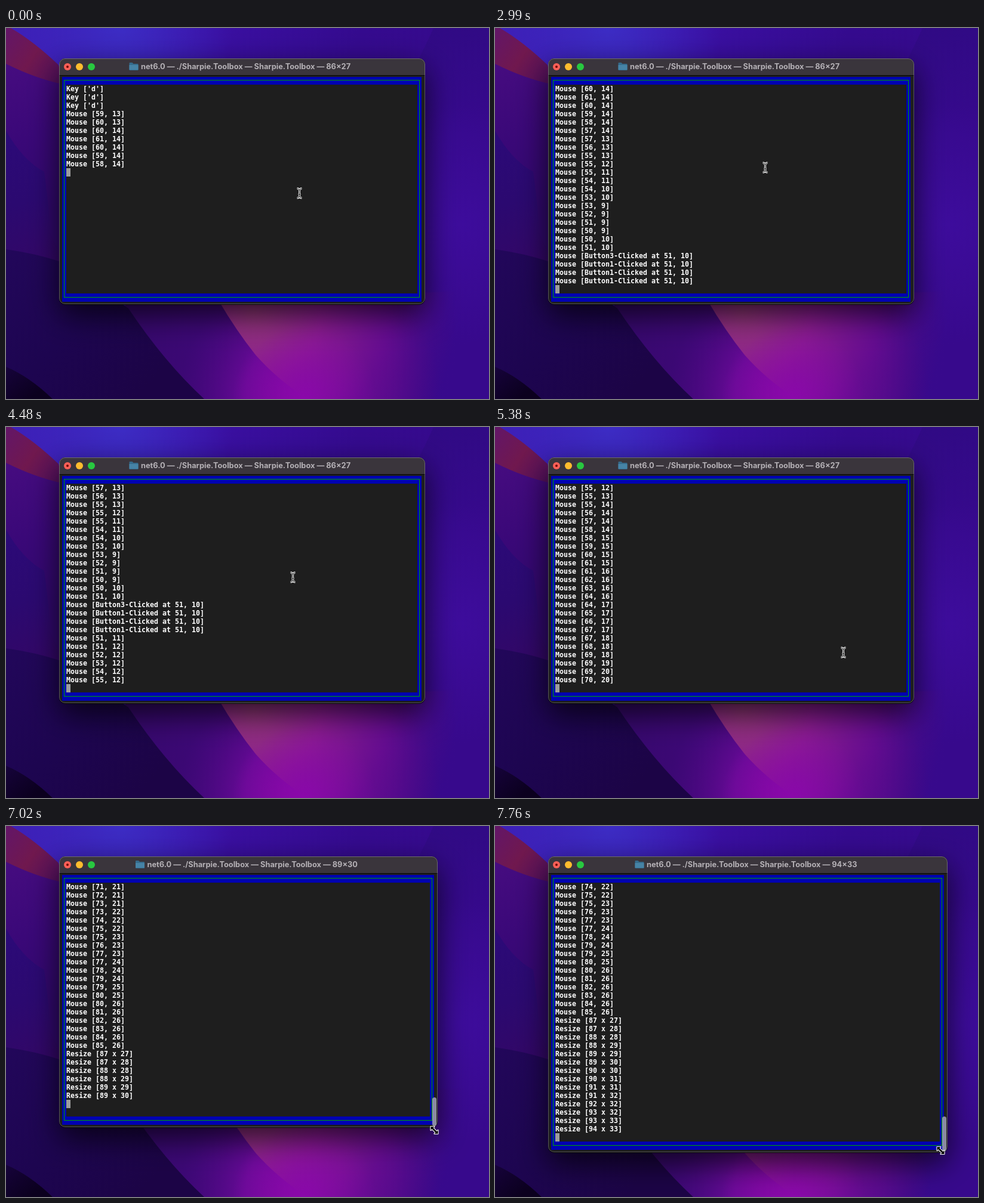
These frames come from a looping animation (809x622 px, 8000 ms). An HTML page with a canvas:

```html
<!DOCTYPE html>
<html lang="en">
<head>
<meta charset="utf-8">
<title>Terminal events</title>
<style>
  html, body { margin: 0; width: 100%; height: 100%; overflow: hidden; background: #1c0548; }
  canvas { display: block; }
</style>
</head>
<body>
<canvas id="stage" width="809" height="622"></canvas>
<script>
const ctx = document.getElementById('stage').getContext('2d');
const LOOP = 8000, TICK = 149.2, COL = 7, ROW = 14, LEFT = 94, TOP = 81;

// Key points of the gesture: tick, lines logged (clicks not counted), pointer x, y.
const keys = [
  [0, 10, 491, 277], [3, 19, 468, 232], [5, 24, 446, 220], [6, 25, 452, 234],
  [20, 25, 452, 234], [23, 27, 452, 252], [25, 27, 452, 252], [30, 31, 480, 252],
  [32, 33, 480, 280], [39, 71, 661, 453], [42, 75, 693, 460], [44, 75, 698, 469],
  [47, 81, 717, 510], [52, 89, 746, 544]
];
const clickTicks = [8, 13, 17, 20];
const resizeTick = 44;

const log = buildLog();

// Letters are one-cell moves, digits are clicks of that button.
function buildLog() {
  const lines = [];
  let first = 0, cols = 86, rows = 27, x = 59, y = 13;
  const print = (text, newCols = cols, newRows = rows) => {
    if (lines.length + 1 - first > rows - 3) first++;
    [cols, rows] = [newCols, newRows];
    lines.push({ text, first, cols, rows });
  };
  for (let i = 0; i < 3; i++) print("Key ['d']");
  print(`Mouse [${x}, ${y}]`);
  const moves = 'RDRLLL' + 'LULLUULULULLLDR' + '3111' + 'DDRRRR' + 'DD' +
    'RRRD'.repeat(4) + 'RRD' + 'DRR'.repeat(5) + 'DRDRRRRR';
  for (const m of moves) {
    if (m > '0' && m < '9') { print(`Mouse [Button${m}-Clicked at ${x}, ${y}]`); continue; }
    x += (m === 'R') - (m === 'L');
    y += (m === 'D') - (m === 'U');
    print(`Mouse [${x}, ${y}]`);
  }
  for (const m of 'RDRDRDRDRDRRDR') {
    const c = cols + (m === 'R'), r = rows + (m === 'D');
    print(`Resize [${c} x ${r}]`, c, r);
  }
  return lines;
}

function stateAt(tick) {
  const next = keys.findIndex(k => k[0] > tick);
  const to = keys.at(next), from = next < 0 ? to : keys[next - 1];
  const p = next < 0 ? 0 : (tick - from[0]) / (to[0] - from[0]);
  const [, lines, x, y] = from.map((v, i) => Math.floor(v + (to[i] - v) * p));
  return { count: lines + clickTicks.filter(c => c <= tick).length, x, y };
}

function shade(gradient, colors) {
  colors.forEach((c, i) => gradient.addColorStop(i / (colors.length - 1), c));
  return gradient;
}
const linear = (x0, y0, x1, y1, ...colors) => shade(ctx.createLinearGradient(x0, y0, x1, y1), colors);
const radial = (x, y, r, ...colors) => shade(ctx.createRadialGradient(x, y, 0, x, y, r), colors);

function fill(path, style) {
  ctx.fillStyle = style;
  ctx.fill(new Path2D(path));
}
function rect(x, y, w, h, style) {
  ctx.fillStyle = style;
  ctx.fillRect(x, y, w, h);
}
function disc(x, y, r, style) {
  ctx.fillStyle = style;
  ctx.beginPath();
  ctx.arc(x, y, r, 0, 7);
  ctx.fill();
}
function round(x, y, w, h, r) {
  ctx.beginPath();
  ctx.roundRect(x, y, w, h, r);
}

function drawWallpaper() {
  const all = 'M0 0H809V622H0Z';
  fill(all, linear(0, 0, 809, 260, '#3d20b8', '#3b10a6', '#340a8e', '#37098c'));
  fill(all, radial(190, 0, 190, '#3c2cc4', '#3c2cc400'));
  fill('M716 0Q690 60 640 140L809 220V0Z', linear(700, 0, 740, 180, '#300a84', '#300a8400'));
  fill(all, radial(760, 330, 200, '#3d0c9c', '#3d0c9c00'));
  // left folds
  fill('M0 50Q60 62 110 110V420H0Z', linear(0, 60, 90, 300, '#460c80', '#3a0878', '#30086c'));
  fill('M0 0H8Q46 22 88 62L98 95Q50 85 0 60Z', linear(0, 10, 95, 80, '#641666', '#70184e', '#541060'));
  fill('M0 172Q28 222 64 241Q72 300 74 342L110 420H0Z', linear(0, 180, 70, 400, '#2c0a78', '#2b0970', '#330766'));
  // lower folds and magenta ridge
  fill('M200 440H809V622H200Z', linear(230, 450, 760, 540, '#37086e', '#40087a', '#430986', '#390a8c00'));
  fill(all, radial(510, 620, 220, '#8408a4', '#680a96', '#4a088000'));
  fill('M355 455Q386 508 418 548Q455 590 505 622H809V440Z',
    radial(415, 475, 340, '#93367a', '#8a1c90', '#640c90', '#430a8400'));
  fill(all, radial(500, 620, 120, '#8a08aa', '#8a08aa00'));
  fill('M0 371Q50 378 92 392L205 470Q265 560 332 622H0Z',
    linear(0, 380, 240, 600, '#22075a', '#1d0550', '#1c0446'));
  fill('M0 568Q40 585 78 622H0Z', linear(0, 570, 40, 622, '#16033a', '#0b001e'));
}

function drawFolder(x) {
  fill(`M${x} 59q0-1 1-1h4l2 2h7q1 0 1 1v9q0 1-1 1h-13q-1 0-1-1Z`, '#356b8c');
  rect(x, 62, 15, 8, '#4683a6');
}

function drawWindow({ cols, rows }) {
  const x = 89, w = cols * COL + 10, h = rows * ROW + 34;
  const gridW = cols * COL, gridH = rows * ROW;

  ctx.save();
  ctx.shadowColor = 'rgba(0,0,0,.7)';
  ctx.shadowBlur = 50;
  ctx.shadowOffsetY = 18;
  round(x, 51, w + 1, h + 1, 10);
  ctx.fillStyle = '#000';
  ctx.fill();
  ctx.restore();

  ctx.save();
  round(x, 51, w + 1, h, 10);
  ctx.clip();
  rect(x, 51, w + 1, h, '#1e1e1e');
  rect(x, 51, w + 1, 28, '#3a353c');
  rect(x, 79, w + 1, 1, '#080808');
  ctx.restore();
  ctx.lineWidth = 1;
  ctx.strokeStyle = 'rgba(255,255,255,.25)';
  round(x + .5, 51.5, w, h - 1, 9.5);
  ctx.stroke();

  disc(103, 65, 6, '#ff5f57');
  disc(103, 65, 2, '#6e0500');
  disc(123, 65, 6, '#febc2e');
  disc(143, 65, 6, '#28c840');

  const shift = (cols - 86) * COL / 2;
  drawFolder(206.5 + shift);
  ctx.font = 'bold 12.8px Inter, sans-serif';
  ctx.fillStyle = '#b5b1b6';
  ctx.fillText(`net6.0 — ./Sharpie.Toolbox — Sharpie.Toolbox — ${cols}×${rows}`, 226 + shift, 69);

  rect(LEFT, TOP + 1, gridW, gridH - 1, '#0000b2');
  rect(LEFT + COL, TOP + ROW, gridW - 2 * COL, gridH - 2 * ROW, '#1e1e1e');
  ctx.strokeStyle = '#00a600';
  ctx.strokeRect(LEFT + 3.5, TOP + 6.5, gridW - COL, gridH - ROW);

  if (cols > 86) {
    const length = 48 + (rows - 30) * 3.3;
    round(x + w - 8, TOP + gridH + 2 - length, 7, length, 3.5);
    ctx.fillStyle = 'rgba(160,160,180,.85)';
    ctx.fill();
  }
}

function drawLog(count) {
  const { first } = log[count - 1];
  ctx.font = 'bold 11.63px "DejaVu Sans Mono", monospace';
  ctx.fillStyle = '#fff';
  log.slice(first, count).forEach(({ text }, i) =>
    ctx.fillText(text, LEFT + COL, TOP + (i + 1) * ROW + 11));
  rect(LEFT + COL, TOP + (count - first + 1) * ROW, COL, ROW, '#9c9c9c');
}

function drawPointer(x, y, resizing) {
  ctx.save();
  ctx.translate(x + .5, y);
  ctx.lineJoin = 'round';
  if (resizing) {
    const arrow = new Path2D('M-6-6H0L-2-4L4 2L6 0V6H0L2 4L-4-2L-6 0Z');
    ctx.strokeStyle = '#fff';
    ctx.lineWidth = 2.2;
    ctx.stroke(arrow);
    ctx.fillStyle = '#000';
    ctx.fill(arrow);
  } else {
    const beam = new Path2D('M-4-8Q0-8 0-4Q0-8 4-8M0-5V5M-4 8Q0 8 0 4Q0 8 4 8M-2 2H2');
    for (const [color, width] of [['#fff', 3], ['#111', 1]]) {
      ctx.strokeStyle = color;
      ctx.lineWidth = width;
      ctx.stroke(beam);
    }
  }
  ctx.restore();
}

function draw() {
  const tick = Math.floor(performance.now() % LOOP / TICK);
  const { count, x, y } = stateAt(tick);
  drawWallpaper();
  drawWindow(log[count - 1]);
  drawLog(count);
  drawPointer(x, y, tick >= resizeTick);
  requestAnimationFrame(draw);
}
draw();
</script>
</body>
</html>
```
